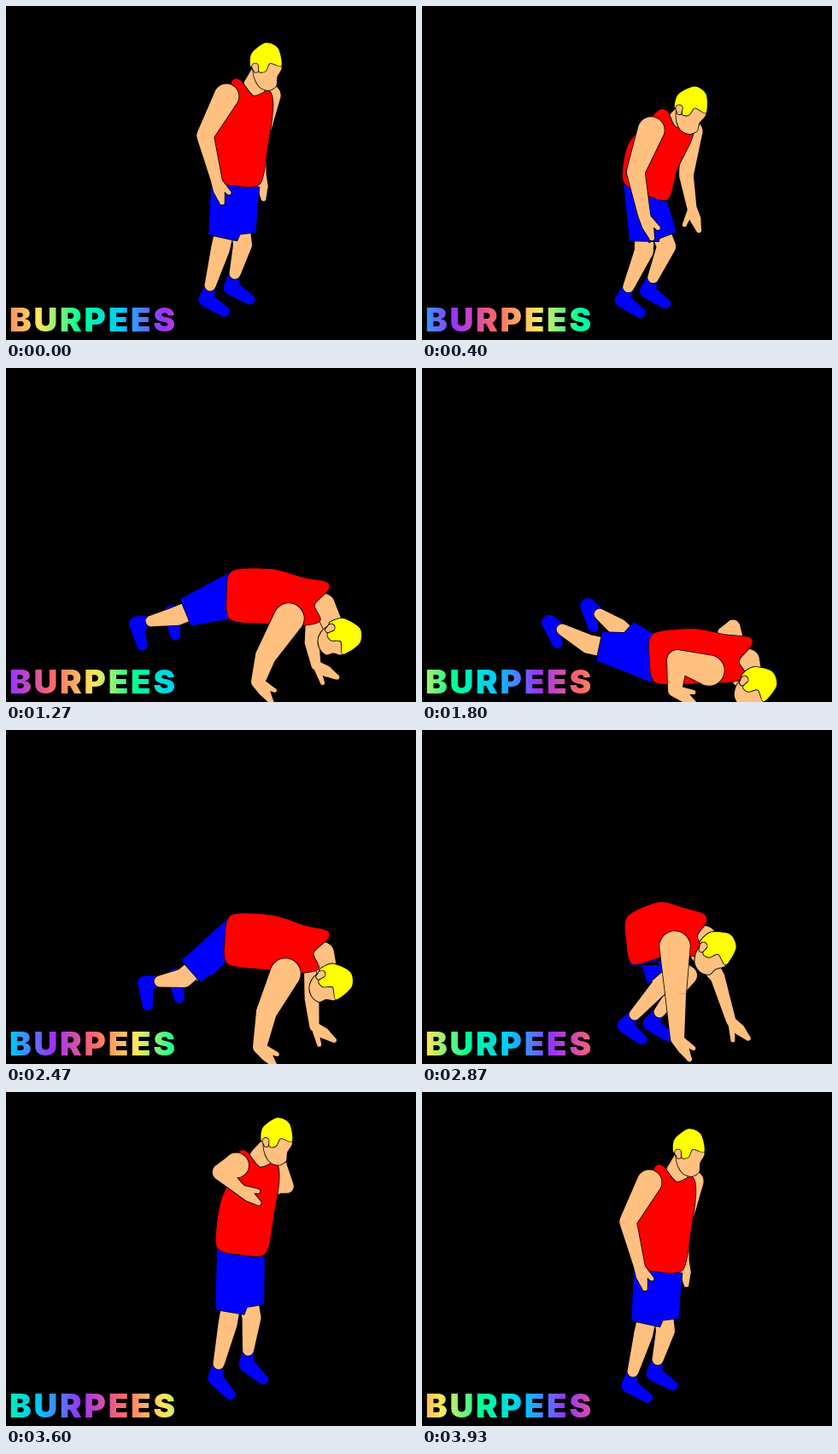
An HTML page with a canvas for the animation above (3.99 s loop, 480 by 392 pixels).

```html
<!DOCTYPE html>
<html>
<head>
<meta charset="utf-8">
<title>Burpees</title>
<style>
html, body { margin: 0; height: 100%; overflow: hidden; background: #000; }
canvas { display: block; }
</style>
</head>
<body>
<canvas id="stage" width="480" height="392"></canvas>
<script>
const ctx = document.getElementById('stage').getContext('2d');
const LOOP = 3990, STEP = 200 / 3, RAD = Math.PI / 180;
const SKIN = '#ffc080', RED = '#f00', BLUE = '#00f', YELLOW = '#ff0';
const RAINBOW = ['#ff6666', '#ffe65c', '#00ff96', '#00c8ff', '#9b32ff'];
const WAVE = 245;

// Joints: neck, hip, head | near shoulder, elbow, wrist | far elbow, wrist |
// near knee, ankle | far knee, ankle | angles: head tilt, hand bend, foot flex
const stand = [
  [291,94], [268,207], [304,68], [258,106], [233,152], [246,203], [296,165], [299,198],
  [251,285], [239,328], [277,280], [268,314], [0, 0, 72]];
const crouch = [
  [331,243], [242,247], [342,260], [296,254], [297,310], [299,362], [346,290], [362,342],
  [284,295], [249,334], [311,288], [278,331], [42, 28, 92]];
const plank = [
  [372,278], [262,266], [389,316], [331,294], [304,338], [295,368], [358,322], [363,349],
  [200,291], [170,297], [222,283], [210,285], [68, 50, 92]];
const prone = [
  [382,343], [270,340], [389,374], [336,355], [299,343], [296,378], [364,304], [352,310],
  [195,324], [164,307], [230,305], [208,289], [50, 60, 140]];
const push = [
  [371,262], [260,245], [379,297], [327,286], [305,331], [297,372], [358,315], [361,348],
  [208,291], [180,295], [222,283], [214,285], [62, 50, 88]];
const reach = [
  [298,60], [273,168], [321,42], [273,66], [262,36], [292,24], [353,56], [332,29],
  [260,260], [251,310], [290,250], [291,292], [5, 12, 36]];

// hop lifts the hips on the way to a pose, shift moves the whole figure
const TRACK = [
  [0, stand], [12, crouch, { ease: 1.9 }], [19, plank, { hop: 42 }], [24, prone],
  [32, prone], [37, push], [43, crouch, { hop: 26 }], [49, reach], [51, reach],
  [57, stand, { shift: 8 }], [59, stand, { shift: 8 }]];

// Torso outline: share of the spine, distance to the front
const TORSO = [
  [1, -27], [1.03, -18], [.9, 1], [.98, 18], [.82, 26], [.44, 29],
  [.04, 29], [-.03, 0], [0, -28], [.42, -35], [.76, -29]];
const HAIR = [
  [-17, 3], [-16, -12], [0, -24], [14, -18], [18, 2], [5, -1], [0, 8], [-7, 9], [-10, 0]];
const FACE = [[-14, -4], [0, -14], [16, -6], [18, 5], [13, 15], [12, 25], [4, 30], [-6, 27], [-13, 15]];

const lerp = (a, b, u) => a + (b - a) * u;
const between = (p, q, u) => p.map((v, i) => lerp(v, q[i], u));
const angle = (p, q) => Math.atan2(q[1] - p[1], q[0] - p[0]);
const polar = ([x, y], a, r) => [x + Math.cos(a) * r, y + Math.sin(a) * r];

function paint(color) {
  ctx.strokeStyle = '#000';
  ctx.lineWidth = 1.6;
  ctx.lineJoin = 'round';
  ctx.stroke();
  ctx.fillStyle = color;
  ctx.fill();
}

// Closed smooth curve through every point
function blob(pts, color) {
  const n = pts.length, at = i => pts[(i + n) % n];
  const handle = (i, way) => at(i).map((v, k) => v + way * (at(i + 1)[k] - at(i - 1)[k]) / 7);
  ctx.beginPath();
  ctx.moveTo(...pts[0]);
  for (let i = 0; i < n; i++) {
    ctx.bezierCurveTo(...handle(i, 1), ...handle(i + 1, -1), ...at(i + 1));
  }
  paint(color);
}

function polygon(pts) {
  pts.forEach(p => ctx.lineTo(...p));
  ctx.closePath();
}

// Adds a chain of tapered round segments to the path
function chain(pts, radii) {
  pts.forEach((p, i) => {
    const r = radii[i], q = pts[i + 1];
    ctx.moveTo(p[0] + r, p[1]);
    ctx.arc(...p, r, 0, 2 * Math.PI);
    if (!q) return;
    const side = angle(p, q) - Math.PI / 2, s = radii[i + 1];
    ctx.moveTo(...polar(p, side, r));
    polygon([polar(q, side, s), polar(q, side, -s), polar(p, side, -r), polar(p, side, r)]);
  });
}

function tube(pts, radii, color) {
  ctx.beginPath();
  chain(pts, radii);
  paint(color);
}

function arm(shoulder, elbow, wrist, k, bend, thumb) {
  const dir = angle(elbow, wrist) - bend * RAD;
  ctx.beginPath();
  chain([shoulder, elbow, wrist, polar(wrist, dir, 14), polar(wrist, dir, 28)],
    [15.5 * k, 10.5 * k, 7 * k, 6.5, 3]);
  chain([wrist, polar(wrist, dir + thumb, 22)], [5 * k, 2.5]);
  paint(SKIN);
}

const hem = (hip, knee) => between(hip, knee, .83);

function leg(hip, knee, ankle, flex) {
  const shin = angle(knee, ankle), heel = polar(ankle, shin, 17);
  tube([polar(ankle, shin, 4), heel, polar(heel, shin - flex * RAD, 26)], [7, 9, 6], BLUE);
  tube([hem(hip, knee), knee, ankle], [11, 11, 6.5], SKIN);
}

function shorts(back, front, hip, knees) {
  ctx.beginPath();
  for (const knee of knees) {
    const side = angle(hip, knee) - Math.PI / 2, end = hem(hip, knee);
    ctx.moveTo(...back);
    polygon([front, polar(end, side, 17), polar(end, side, -17), back]);
  }
  paint(BLUE);
}

function head([x, y], tilt, scale) {
  ctx.save();
  ctx.translate(x, y);
  ctx.rotate(tilt * RAD);
  ctx.scale(scale, scale);
  blob(FACE.map(([fx, fy]) => [fx, fy * (1 - tilt / 250)]), SKIN);
  blob(HAIR, YELLOW);
  tube([[-12, 3], [-11, 7]], [3.5, 2.5], SKIN);
  ctx.restore();
}

function figure(pose) {
  const [neck, hip, skull, shoulder, elbow, wrist, farElbow, farWrist,
    knee, ankle, farKnee, farAnkle, [tilt, bend, flex]] = pose;
  const spine = angle(hip, neck), length = Math.hypot(neck[0] - hip[0], neck[1] - hip[1]);
  const lean = Math.cos(spine), arch = Math.max(0, 110 - length) * .4;
  const body = ([u, v]) => polar(
    polar(hip, spine, u * length), spine + Math.PI / 2, v - arch * Math.sin(Math.PI * u));

  arm(body([.94, 20]), farElbow, farWrist, .8, bend, .7);
  leg(hip, farKnee, farAnkle, flex);
  leg(hip, knee, ankle, flex);
  shorts(body([0, -28]), body([0, 29]), hip, [farKnee, knee]);
  tube([neck, skull], [13, 11], SKIN);
  blob(TORSO.map(body), RED);
  arm(shoulder, elbow, wrist, .88 + .27 * lean, bend, -.5);
  head(skull, tilt, 1 + .14 * lean);
}

function title(step) {
  const x = 6 + WAVE * (step % 15 / 15 - 1.07);
  const fill = ctx.createLinearGradient(x, 0, x + 2 * WAVE, 0);
  for (let i = 0; i <= 10; i++) fill.addColorStop(i / 10, RAINBOW[i % 5]);
  ctx.fillStyle = fill;
  ctx.font = '900 38.5px Inter, "Open Sans", sans-serif';
  ctx.letterSpacing = '2.8px';
  ctx.fillText('BURPEES', 4, 382);
}

function draw(now) {
  const step = Math.floor((now % LOOP + 3.4) / STEP);
  const next = TRACK.findIndex(key => key[0] > step);
  const i = next < 0 ? TRACK.length - 1 : next;
  const [s0, from, { shift: x0 = 0 } = {}] = TRACK[i - 1];
  const [s1, to, { ease = 1, hop = 0, shift: x1 = 0 } = {}] = TRACK[i];
  const u = Math.min(1, (step - s0) / (s1 - s0)) ** ease;
  const lift = hop * Math.sin(Math.PI * u);
  const pose = from.map((joint, j) => between(joint, to[j], u));
  pose[1][1] -= lift;
  for (const j of [8, 9, 10, 11]) pose[j][1] -= lift / 2;

  ctx.fillStyle = '#000';
  ctx.fillRect(0, 0, 480, 392);
  ctx.save();
  ctx.translate(lerp(x0, x1, u), 0);
  figure(pose);
  ctx.restore();
  title(step);
}

const start = performance.now();
function tick() {
  draw(performance.now() - start);
  requestAnimationFrame(tick);
}
tick();
</script>
</body>
</html>
```
